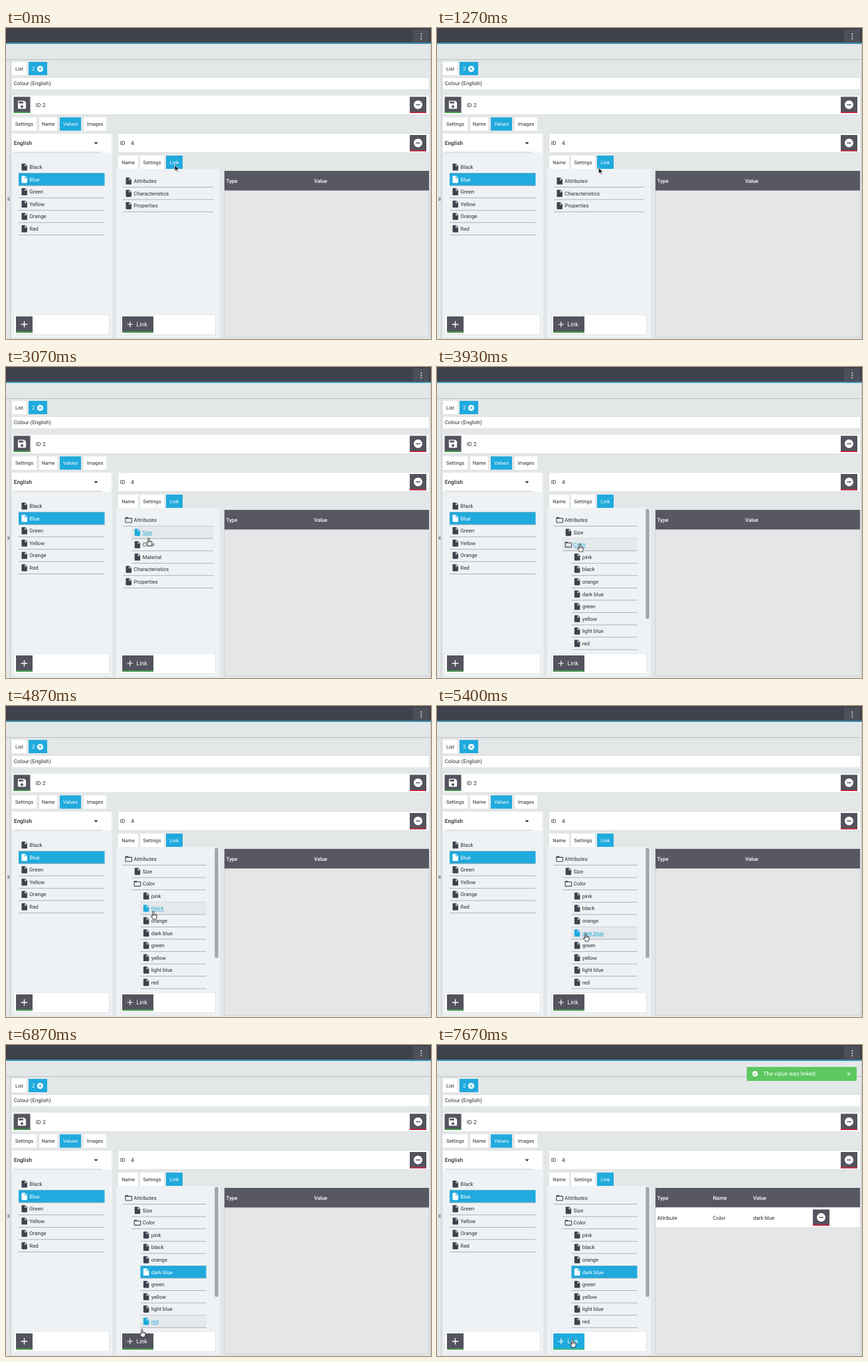
Animation of 640x468 px, one loop 8 s. Source, as an HTML page with a canvas:

```html
<!DOCTYPE html>
<html lang="en">
<head>
<meta charset="utf-8">
<title>Linking a value</title>
<style>
html, body { margin: 0; width: 100%; height: 100%; overflow: hidden; background: #e4e7e8; }
canvas { display: block; }
</style>
</head>
<body>
<canvas id="stage" width="640" height="468"></canvas>
<script>
const c = document.getElementById('stage').getContext('2d');
const LOOP = 8000, STEP = 1000 / 15, ROW = 18.56;
const BG = '#e4e7e8', PANEL = '#eef2f5', DARK = '#3f424d', BUTTON = '#53545e', BLUE = '#20aadd',
      INK = '#2c2d31', LINE = '#b3b6b9', GREEN = '#45c345', RED = '#ec1232', WHITE = '#fff';

const DISC = 'M12 2C6.48 2 2 6.48 2 12s4.48 10 10 10 10-4.48 10-10S17.52 2 12 2z';
const icons = {
  file: 'M6 2c-1.1 0-2 .9-2 2v16c0 1.1.9 2 2 2h12c1.1 0 2-.9 2-2V8l-6-6H6zm7 7V3.5L18.5 9H13z',
  folder: 'M20 6h-8l-2-2H4c-1.1 0-2 .9-2 2v12c0 1.1.9 2 2 2h16c1.1 0 2-.9 2-2V8c0-1.1-.9-2-2-2zm0 12H4V8h16v10z',
  save: 'M17 3H5c-1.1 0-2 .9-2 2v14c0 1.1.9 2 2 2h14c1.1 0 2-.9 2-2V7l-4-4zm-5 16a3 3 0 1 1 0-6 3 3 0 0 1 0 6zm3-10H5V5h10v4z',
  plus: 'M19 13h-6v6h-2v-6H5v-2h6V5h2v6h6z',
  minus: DISC + 'M7 11h10v2H7z',
  check: DISC + 'M10 17l-5-5 1.4-1.4 3.6 3.6 7.6-7.6L19 8z',
  cancel: DISC + 'M17 15.6L15.6 17 12 13.4 8.4 17 7 15.6l3.6-3.6L7 8.4 8.4 7l3.6 3.6L15.6 7 17 8.4 13.4 12z',
  close: 'M19 6.4L17.6 5 12 10.6 6.4 5 5 6.4l5.6 5.6L5 17.6 6.4 19l5.6-5.6 5.6 5.6 1.4-1.4-5.6-5.6z'
};
for (const name in icons) icons[name] = new Path2D(icons[name]);
const arrow = new Path2D('M0 0V9.5L2.2 7.4 3.7 10.8 5.2 10.1 3.7 6.9H6.8Z');
const hand = new Path2D('M-1 1a1 1 0 0 1 2 0V4.5L4.6 5.3Q5.5 5.6 5.3 6.6L4.9 9.2 4.2 12H-.8L-1.2 10.6-3.4 7.9Q-3.9 6.8-2.8 6.6L-1 7.6Z');
const knuckles = new Path2D('M-1 7.6V4M1 4.5V7M2.6 5V7M4 5.3V7.2');

// Cursor moves: start, end, target x, target y
const start = [254, 206];
const moves = [[1203, 1867, 213, 231], [2733, 3333, 215, 266], [4533, 5400, 224, 342], [6333, 7133, 204, 443]];

const between = (v, a, b) => v >= a && v < b;

function rect(x, y, right, bottom, color) {
  c.fillStyle = color;
  c.fillRect(x, y, right - x, bottom - y);
}
function box(x, y, right, bottom, border = '#d3d6d8') {
  rect(x - .5, y - .5, right + .5, bottom + .5, border);
  rect(x, y, right, bottom, WHITE);
}
function text(s, x, mid, { size = 7.9, color = INK, weight = 400, align = 'left' } = {}) {
  c.font = `${weight} ${size}px Roboto, Arial, sans-serif`;
  c.textAlign = align;
  c.fillStyle = color;
  c.fillText(s, x, mid + size * .36);
}
function icon(name, x, y, scale, color) {
  c.save();
  c.translate(x - 12 * scale, y - 12 * scale);
  c.scale(scale, scale);
  c.fillStyle = color;
  c.fill(icons[name], 'evenodd');
  c.restore();
}
function button(x, y, right, bottom, edge, fill = BUTTON) {
  rect(x, y, right, bottom, fill);
  c.strokeStyle = edge;
  c.lineWidth = 1.8;
  c.setLineDash([2, .7]);
  c.beginPath();
  c.moveTo(x, bottom - .9);
  c.lineTo(right, bottom - .9);
  c.stroke();
  c.setLineDash([]);
}
function removeButton(x, y) {
  button(x, y, x + 25, y + 24.5, RED);
  icon('minus', x + 12.5, y + 12, .64, WHITE);
}
function tab(label, x, right, y, active) {
  rect(x, y, right, y + 20, active ? BLUE : WHITE);
  text(label, (x + right) / 2, y + 10, { size: 7.4, color: active ? WHITE : INK, align: 'center' });
}
function row(label, x, right, mid, { selected, hovered, open } = {}) {
  const color = selected ? WHITE : hovered ? BLUE : INK;
  const top = mid - ROW / 2;
  if (selected) rect(x, top, right, top + ROW, BLUE);
  else if (hovered) rect(x, top, right, top + ROW, '#e5e9eb');
  rect(x, top + ROW - .4, right, top + ROW + .4, '#9fa2a6');
  icon(open ? 'folder' : 'file', x + 8.7, mid, .53, open ? DARK : color === INK ? DARK : color);
  text(label, x + 16.3, mid, { color });
  if (hovered) rect(x + 16.3, mid + 4, x + 16.3 + c.measureText(label).width, mid + 4.7, color);
}

function cursorAt(t) {
  let [x, y] = start;
  for (const [from, to, tx, ty] of moves) {
    const p = Math.min(1, Math.max(0, (t - from) / (to - from)));
    x += (tx - x) * (1 - (1 - p) ** 3);
    y += (ty - y) * (1 - (1 - p) ** 1.7);
  }
  return [x, y];
}

function treeRows(t) {
  const rows = [['Attributes', 0, t >= 2128]];
  if (t >= 2262) rows.push(['Size', 1], ['Color', 1, t >= 3662]);
  if (t >= 3928) {
    for (const name of ['pink', 'black', 'orange', 'dark blue', 'green', 'yellow', 'light blue', 'red']) rows.push([name, 2]);
  } else {
    if (t >= 2262) rows.push(['Material', 1]);
    rows.push(['Characteristics', 0], ['Properties', 0]);
  }
  return rows;
}

function drawFrame() {
  rect(0, 0, 640, 468, BG);
  rect(0, 0, 640, 22.5, DARK);
  rect(613, 2, 637, 22.5, '#4d4f59');
  rect(0, 22.5, 640, 24, '#2595c2');
  c.fillStyle = WHITE;
  for (const y of [9, 12.6, 16.2]) {
    c.beginPath();
    c.arc(625.3, y, .9, 0, 7);
    c.fill();
  }
  rect(0, 47, 640, 47.8, LINE);
  rect(6, 48, 6.8, 468, '#c6c9cb');
  rect(2.6, 255, 3.4, 260, '#555');
  rect(4.4, 255, 5.2, 260, '#555');
  rect(639, 24, 640, 468, '#c6c9cb');

  tab('List', 9, 31, 51);
  rect(34, 51, 62, 71, BLUE);
  text('2', 39, 61, { color: WHITE });
  icon('cancel', 51.5, 61.5, .46, WHITE);
  box(9, 75, 637, 92.5);
  text('Colour (English)', 11.7, 83.5);
  box(9, 101.5, 637, 130);
  button(11.5, 103.5, 36.5, 128, GREEN);
  icon('save', 24, 115.5, .68, WHITE);
  text('ID', 44.7, 116, { size: 8.4 });
  text('2', 55, 116, { size: 8.4 });
  removeButton(608, 103.5);

  tab('Settings', 9, 46, 134.5);
  tab('Name', 50, 77, 134.5);
  tab('Values', 81, 113, 134.5, true);
  tab('Images', 117, 151, 134.5);
}

function drawValues() {
  rect(9, 159, 160, 466, PANEL);
  rect(9, 159, 158, 187.5, WHITE);
  text('English', 11.7, 173.3, { size: 8.4, weight: 500 });
  rect(11.5, 186.6, 144, 187.4, LINE);
  c.fillStyle = INK;
  c.fill(new Path2D('M132.5 172h6l-3 3z'));
  ['Black', 'Blue', 'Green', 'Yellow', 'Orange', 'Red'].forEach((name, i) =>
    row(name, 19, 148.5, 209.3 + i * ROW, { selected: i === 1 }));
  box(12, 431.5, 155, 461);
  button(15, 434, 40, 458.5, GREEN);
  icon('plus', 27.5, 446, .68, WHITE);
}

function drawTree(t, hoverX, hoverY) {
  box(169, 159, 637, 187);
  text('ID', 171.7, 173, { size: 8.4 });
  text('4', 188, 173, { size: 8.4 });
  removeButton(608, 161);
  tab('Name', 169, 199, 192);
  tab('Settings', 202, 238, 192);
  tab('Link', 241, 266, 192, true);

  rect(166, 212, 322, 466, PANEL);
  const full = t >= 3928;
  const right = full ? 301.5 : 312;
  let pointing = false;
  treeRows(t).forEach(([name, level, open], i) => {
    const mid = 230.3 + i * ROW, x = 176 + level * 13.2;
    const hovered = between(hoverY, mid - ROW / 2, mid + ROW / 2) && between(hoverX, x, right);
    pointing ||= hovered;
    row(name, x, right, mid, { hovered, open, selected: name === 'dark blue' && t >= 5728 });
  });
  if (full) {
    c.fillStyle = '#a2a5a9';
    c.beginPath();
    c.roundRect(314.3, 213.5, 5.4, 165.5, 2.5);
    c.fill();
  }

  const overLink = between(hoverY, 434, 459) && between(hoverX, 175, 222);
  box(173, 431.5, 315, 461);
  button(175, 434, 222, 458.5, GREEN, overLink ? BLUE : BUTTON);
  c.globalAlpha = between(t, 7328, 7462) ? .65 : 1;
  icon('plus', 186.8, 446, .6, WHITE);
  text('Link', 196.3, 446, { size: 9, color: WHITE });
  c.globalAlpha = 1;
  return pointing || overLink;
}

function drawTable(linked) {
  const head = { color: WHITE, weight: 500 };
  rect(328.5, 215, 637.5, 465.5, '#c9cccf');
  rect(329.3, 215, 636.7, 464.7, '#e4e6e7');
  rect(329, 215, 637, 244.5, '#575861');
  text('Type', 331.5, 230, head);
  text('Value', linked ? 476 : 464, 230, head);
  if (!linked) return;
  text('Name', 415.5, 230, head);
  rect(329.5, 244.5, 636.7, 274, WHITE);
  text('Attribute', 331.5, 259.8);
  text('Color', 415.5, 259.8);
  text('dark blue', 476, 259.8);
  removeButton(566, 247.5);

  c.fillStyle = '#5cc85f';
  c.beginPath();
  c.roundRect(466.5, 33, 165.5, 21, 1);
  c.fill();
  icon('check', 479, 43.3, .43, WHITE);
  text('The value was linked.', 491.5, 43.3, { size: 8.5, color: WHITE });
  icon('close', 620.3, 43.5, .36, WHITE);
}

function drawCursor(x, y, pointing) {
  c.save();
  c.translate(x, y);
  c.lineWidth = .8;
  c.lineJoin = 'round';
  c.fillStyle = pointing ? WHITE : '#111';
  c.strokeStyle = pointing ? '#111' : WHITE;
  c.fill(pointing ? hand : arrow);
  c.stroke(pointing ? hand : arrow);
  if (pointing) {
    c.lineWidth = .5;
    c.stroke(knuckles);
  }
  c.restore();
}

function draw(now) {
  const t = Math.floor((now % LOOP + 5) / STEP) * STEP;
  c.textRendering = 'geometricPrecision';
  drawFrame();
  drawValues();
  // Hover styles trail the cursor by one step
  const pointing = drawTree(t, ...cursorAt(t - STEP));
  drawTable(t >= 7662);
  drawCursor(...cursorAt(t), pointing);
}

const begin = performance.now();
function tick() {
  draw(performance.now() - begin);
  requestAnimationFrame(tick);
}
tick();
</script>
</body>
</html>
```
